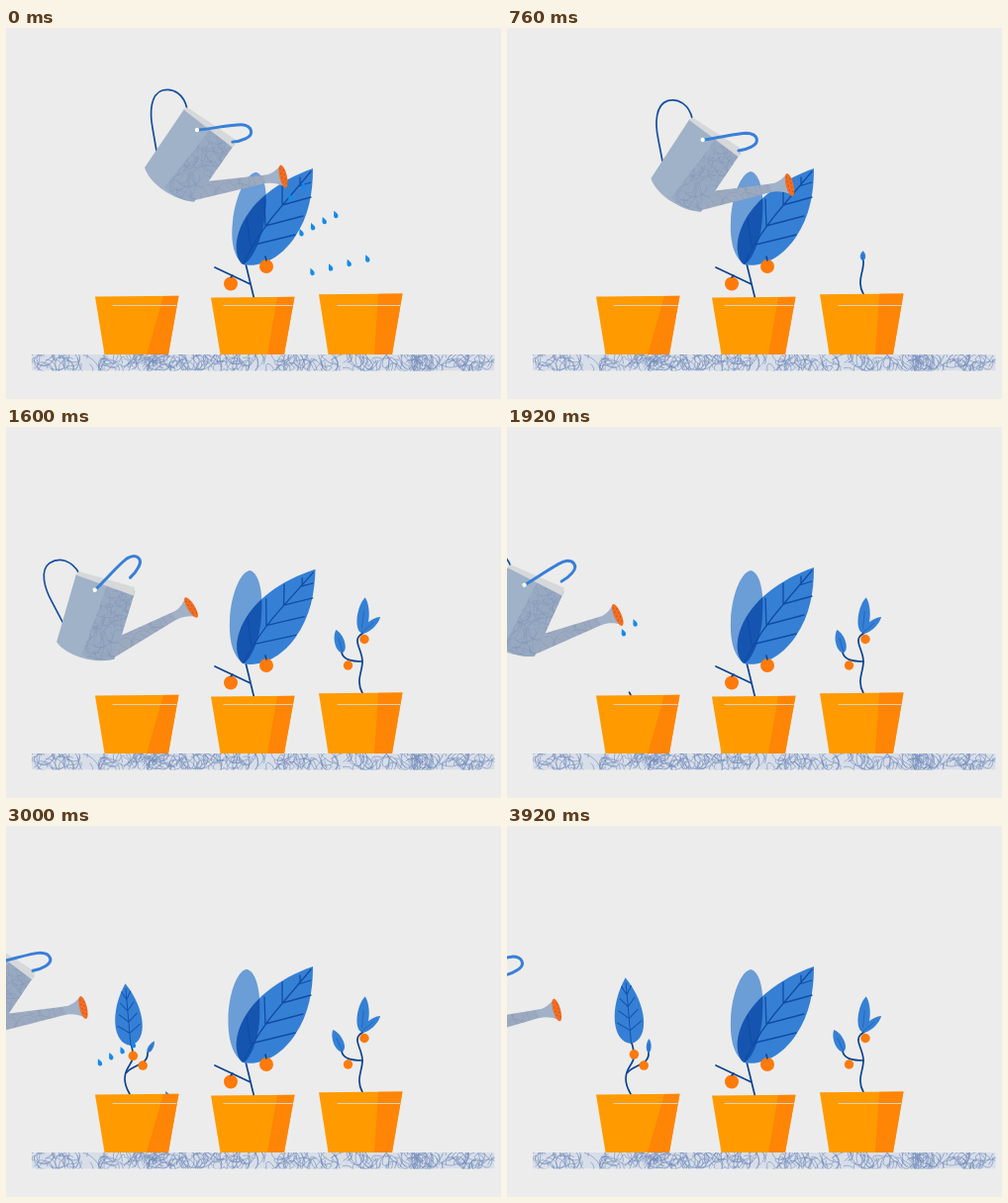
Recreate the animation shown at these times as an HTML page with a canvas. Size 500 px wide and 375 px high, loop 3.96 s.

```html
<!DOCTYPE html>
<html lang="en">
<head>
<meta charset="utf-8">
<title>Watering plants</title>
<style>
html, body { margin: 0; width: 100%; height: 100%; overflow: hidden; background: #ececec; }
canvas { display: block; width: 500px; height: 375px; }
</style>
</head>
<body>
<canvas id="stage" width="500" height="375"></canvas>
<script>
const ctx = document.getElementById('stage').getContext('2d');
const LOOP = 3960;
const NAVY = '#0b438f', LEAF = '#3580d5', VEIN = '#1252ad', FRUIT = '#fd7a0b';

// Eased 0..1 progress between two times.
function ramp(t, from, to) {
  const u = Math.min(1, Math.max(0, (t - from) / (to - from)));
  return u * u * (3 - 2 * u);
}

function stemPath(d) {
  const el = document.createElementNS('http://www.w3.org/2000/svg', 'path');
  el.setAttribute('d', d);
  const len = el.getTotalLength();
  return { path: new Path2D(d), len, at: f => el.getPointAtLength(len * f) };
}

// Seeded pencil loops inside a rectangle.
function scribble(x, y, w, h, count, size, seed) {
  const rnd = () => (seed = (seed * 16807) % 2147483647) / 2147483647;
  const lines = new Path2D();
  for (let i = 0; i < count; i++) {
    const arc = new Path2D(), start = rnd() * 6.3;
    arc.ellipse(x + rnd() * w, y + rnd() * h, size * (0.5 + rnd()), size * (0.3 + rnd() * 0.7),
      rnd() * 3, start, start + 1.5 + rnd() * 3);
    lines.addPath(arc);
  }
  return lines;
}

function fill(path, color) { ctx.fillStyle = color; ctx.fill(path); }
function stroke(path, color, width) {
  ctx.strokeStyle = color; ctx.lineWidth = width; ctx.stroke(path);
}
function scoped(draw) { ctx.save(); draw(); ctx.restore(); }
function turn(deg, x, y) {
  ctx.translate(x, y); ctx.rotate(deg * Math.PI / 180); ctx.translate(-x, -y);
}
function disc(x, y, r, color) {
  if (r <= 0) return;
  ctx.fillStyle = color;
  ctx.beginPath(); ctx.arc(x, y, r, 0, 7); ctx.fill();
}

const ground = new Path2D('M26 330H493.500V346.500H26Z');
const groundLines = scribble(26, 330, 468, 17, 290, 9, 71);
const groundDense = [150, 412].map(x => scribble(x - 12, 330, 24, 17, 24, 7, x));

function drawGround() {
  scoped(() => {
    ctx.clip(ground);
    fill(ground, '#d8dee8');
    [groundLines, ...groundDense].forEach(p => stroke(p, 'rgba(112,139,185,.66)', 0.9));
  });
}

function drawPot(x, y, shadeTop, shadeBottom, lineStart) {
  const right = `L${x + 84.500} ${y - 0.7}L${x + 74} 330`;
  fill(new Path2D(`M${x} ${y}${right}H${x + 9.5}Z`), '#ff9b00');
  fill(new Path2D(`M${x + shadeTop} ${y - 0.5}${right}H${x + shadeBottom}Z`), '#ff8506');
  stroke(new Path2D(`M${x + lineStart} 280.500H${x + 82}`), '#dcd2bf', 1.1);
}

function grow(stem, f) {
  if (f <= 0) return;
  scoped(() => {
    ctx.setLineDash([stem.len * f, stem.len + 9]);
    stroke(stem.path, NAVY, 1.7);
  });
}

function drawLeaf(x, y, deg, len, width, veins) {
  if (len < 1) return;
  scoped(() => {
    ctx.translate(x, y);
    ctx.rotate(deg * Math.PI / 180);
    const w = width * 0.66, shoulder = -len * (veins ? 0.57 : 0.72);
    ctx.beginPath();
    ctx.moveTo(0, 0);
    ctx.bezierCurveTo(-w, -len * 0.05, -w, shoulder, 0, -len);
    ctx.bezierCurveTo(w, shoulder, w, -len * 0.05, 0, 0);
    ctx.fillStyle = LEAF;
    ctx.fill();
    ctx.beginPath();
    ctx.moveTo(0, 0);
    ctx.lineTo(0, -len * (veins ? 0.92 : 0.6));
    if (veins) for (let k = 0.2; k < 0.8; k += 0.18) {
      const reach = width * 0.46 * (1.1 - k), rise = -len * (k + 0.13);
      ctx.moveTo(-reach, rise);
      ctx.lineTo(0, -len * k);
      ctx.lineTo(reach, rise);
    }
    ctx.strokeStyle = VEIN;
    ctx.lineWidth = veins ? 1 : 0.5;
    ctx.stroke();
  });
}

const rightStem = stemPath('M360 269C353 256 360 248 360 237C360 226 351 217 357 211L361 208');
const rightTwig = stemPath('M360 237C348 237 341 235 339 228');

function drawRightPlant(t) {
  const f = ramp(t, 300, 1180), leaf = ramp(t, 480, 1300);
  const side = ramp(t, 1080, 1480), fruit = ramp(t, 1150, 1500);
  grow(rightStem, f);
  grow(rightTwig, ramp(t, 900, 1300));
  const top = rightStem.at(f);
  drawLeaf(top.x - 2 * leaf, top.y, 6 * leaf, 36 * leaf, 3 + 9 * leaf);
  drawLeaf(359, 208, 50, 25 * side, 8 * side);
  drawLeaf(340, 228, -16 - 8 * ramp(t, 1950, 2500), 24 * side, 10 * side);
  disc(362, 214.500, 4.700 * fruit, FRUIT);
  disc(345.500, 241, 4.700 * fruit, FRUIT);
}

const leftStem = stemPath('M125 271C118 259 119 251 124 243C130 234 129 231 126 219');
const leftTwig = stemPath('M122 249C128 241 144 242 143 229');

function drawLeftPlant(t) {
  const f = ramp(t, 1720, 3160), twig = ramp(t, 2380, 2920);
  const len = 67 * ramp(t, 1900, 3200), fruit = 4.800 * ramp(t, 2380, 2800);
  grow(leftStem, f);
  grow(leftTwig, twig);
  const top = leftStem.at(f), bud = leftTwig.at(twig);
  drawLeaf(top.x - 0.5, top.y + 1, 34 - 39 * ramp(t, 2520, 3000), len, len * 0.44, true);
  drawLeaf(bud.x, bud.y, 45 - 43 * ramp(t, 2750, 3400), 14 * ramp(t, 2650, 3050), 5);
  const upper = leftStem.at(f * 0.78), lower = leftTwig.at(twig * 0.62);
  disc(upper.x, upper.y, fruit, FRUIT);
  disc(lower.x, lower.y + 3 * twig, fruit, FRUIT);
}

const bigLeaf = new Path2D('M310 142C276 154 245 176 235 207C230 223 234 235 239 239C258 243 279 231 292 211C306 190 310 167 310 142Z');
const bigVeins = new Path2D('M240 238C251 214 266 194 281 177L308 145M297 158V151M295 160L308 156M279 179V158M279 179L308 171M262 201L261 173M262 200L300 190M247 220L243 192M247 220L292 209');
const backLeaf = new Path2D('M246 145C256 147 260 168 258 191C257 213 248 235 240 239C229 232 225 215 226 195C227 171 236 147 246 145Z');
const bigStem = new Path2D('M250.500 273L241 234M247 259L211 242M228 250V254M262 231V236');

function drawBigPlant(t) {
  const back = 4 * (1 - ramp(t, 0, 700)) - 2 * (ramp(t, 1950, 2500) - ramp(t, 3100, 3900));
  const front = 1.5 * (ramp(t, 1100, 1600) - ramp(t, 1600, 1920));
  stroke(bigStem, NAVY, 1.7);
  scoped(() => { turn(back, 240, 239); fill(backLeaf, '#6b9dd6'); });
  scoped(() => { turn(front, 240, 239); fill(bigLeaf, LEAF); });
  scoped(() => {
    turn(back, 240, 239);
    ctx.clip(backLeaf);
    turn(front - back, 240, 239);
    fill(bigLeaf, '#1555b0');
  });
  scoped(() => { turn(front, 240, 239); stroke(bigVeins, '#104ca5', 1.3); });
  disc(227, 258.500, 7, FRUIT);
  disc(263, 241, 7, FRUIT);
  stroke(new Path2D('M227 252L229 250M262 231L263 235'), NAVY, 1.5);
}

const can = {
  body: new Path2D('M180 82L231 117L190 175.500C171 175 145 158 140 141Z'),
  shade: new Path2D('M207 102L231 117L190 175.500C178 175 168 169 160 161Z'),
  rim: new Path2D('M180 83L183 80L232 113L229 121Z'),
  spout: new Path2D('M203 155L263 148.500L266 156L191 174Z'),
  flare: new Path2D('M260 149C268 148 273 144 277 139L283 161C276 157 269 156 262 157Z'),
  back: new Path2D('M183 82C180 67 169 60 158 63C146 67 145 85 148 101L152 124'),
  handle: new Path2D('M194 103C211 101 226 97 238 97C249 98 251 107 242 111Q236 114 229 114.500'),
  marks: scribble(160, 100, 70, 78, 90, 12, 19),
  spoutMarks: scribble(192, 148, 72, 25, 28, 9, 57)
};

// Position of the rose, tilt of the can and swing of its handle.
function canPose(t) {
  const settle = ramp(t, 0, 700), move = ramp(t, 1000, 2260), leave = ramp(t, 3300, 3960);
  const tilt = -17 * (ramp(t, 1000, 1600) - ramp(t, 1600, 2300)) - settle;
  return {
    x: 280 + 5.5 * settle - 211.500 * move + 4 * ramp(t, 2520, 3000) - 28 * leave,
    y: 150 + 8.5 * settle + 31.500 * ramp(t, 960, 1900) - 6.5 * ramp(t, 1900, 2500) + 2.5 * leave,
    tilt: tilt - 2 * leave,
    swing: tilt + 1 - 4 * move
  };
}

function texture(area, lines, base) {
  scoped(() => {
    fill(area, base);
    ctx.clip(area);
    stroke(lines, 'rgba(122,139,174,.35)', 0.8);
  });
}

function drawCan(t) {
  const { x, y, tilt, swing } = canPose(t);
  scoped(() => {
    ctx.translate(x - 280, y - 150);
    turn(tilt, 280, 150);
    stroke(can.back, '#164f9f', 1.7);
    fill(can.body, '#9fb2c7');
    texture(can.shade, can.marks, '#98aac2');
    texture(can.spout, can.spoutMarks, '#9caac0');
    fill(can.flare, '#a1b2c8');
    fill(can.rim, '#d6d8da');
    scoped(() => {
      turn(swing, 193, 103);
      stroke(can.handle, '#397fd7', 3);
    });
    disc(193, 103, 2.2, '#fff');
    turn(-13, 280, 150);
    ctx.fillStyle = '#f46d20';
    ctx.beginPath(); ctx.ellipse(280, 150, 3.8, 11.800, 0, 0, 7); ctx.fill();
    for (let i = 0; i < 8; i++) disc(280 + (i % 2 ? 1.6 : -1.3), 142 + i * 2.2, 0.7, '#b9562a');
  });
}

const drop = new Path2D('M-1 -4C1 -2 2.400 0 2.200 1.500A2.200 2.200 0 0 1 -2.200 1.500C-2.200 0 -1.200 -2 -1 -4Z');

// Four jets fan out from the rose; the two inner ones appear a little later.
function drawBurst(t, start) {
  const age = (t - start) / 160;
  if (age < 0.5 || age > 4) return;
  const { x, y } = canPose(start + 90);
  for (let jet = 0; jet < 4; jet++) {
    const inner = jet === 1 || jet === 2;
    const py = y + (31 - 7 * jet) * age + (2 + 2 * jet) * age * age;
    if (py > 273 || (inner && age < 0.8)) continue;
    scoped(() => {
      ctx.translate(x + (11 + 7 * jet) * age, py);
      ctx.rotate(-0.2);
      fill(drop, '#148bea');
    });
  }
}

function drawDrops(t) {
  for (let i = 0; i < 4; i++) drawBurst(t, -424 + 160 * i);
  for (let i = 0; i < 6; i++) drawBurst(t, 1832 + 182 * i);
}

function render(t) {
  ctx.fillStyle = '#ececec';
  ctx.fillRect(0, 0, 500, 375);
  drawGround();
  drawLeftPlant(t);
  drawRightPlant(t);
  drawBigPlant(t);
  drawCan(t);
  drawDrops(t);
  drawPot(90, 271.500, 69, 52, 18);
  drawPot(207, 272.500, 67, 57, 13);
  drawPot(316, 269.300, 60, 56, 19);
}

ctx.lineCap = 'round';
ctx.lineJoin = 'round';
const began = performance.now();
function tick() {
  render((performance.now() - began) % LOOP);
  requestAnimationFrame(tick);
}
tick();
</script>
</body>
</html>
```
